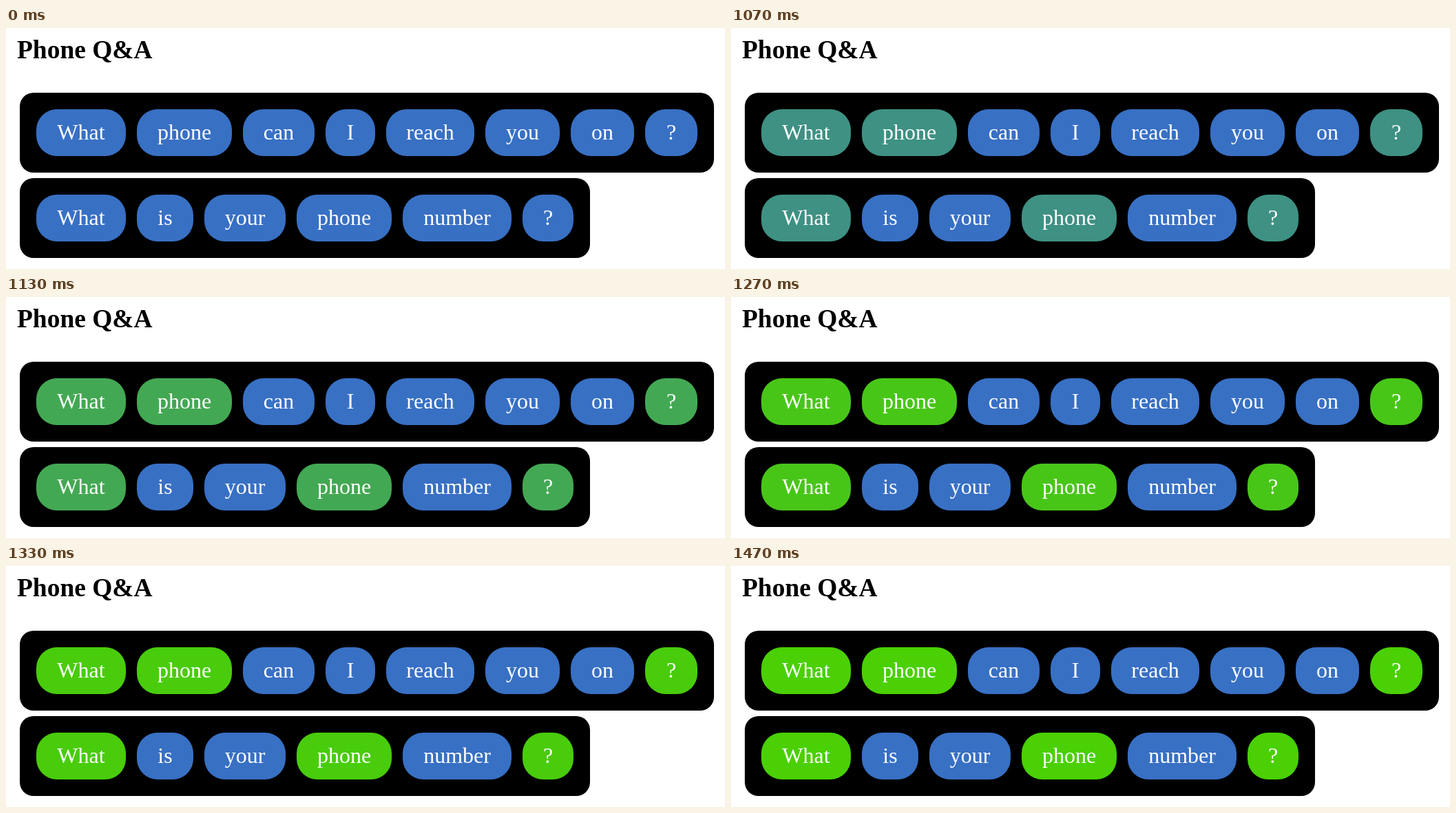
Recreate the animation shown at these times as an HTML page with a canvas. Size 1044x350 px, loop 3.07 s.

```html
<!DOCTYPE html>
<html lang="en">
<head>
<meta charset="utf-8">
<title>Phone Q&amp;A</title>
<style>
  html, body { margin: 0; width: 100%; height: 100%; overflow: hidden; background: #fff; }
  canvas { display: block; }
</style>
</head>
<body>
<canvas id="stage" width="1044" height="350"></canvas>
<script>
const ctx = document.getElementById('stage').getContext('2d');
const SERIF = '"Liberation Serif", "Times New Roman", Times, serif';
const LOOP = 3070;
const STEPS = [1000, 1070, 1130, 1200, 1270, 1330, 1400, 1470];
const FADE = 500, LEAD = 40;
const BLUE = [56, 112, 196], GREEN = [74, 208, 4];
const SHARED = ['What', 'phone', '?'];

// Each word: [text, left, width]
const rows = [
  { y: 94, w: 1008, words: [['What', 44, 130], ['phone', 190, 138], ['can', 344, 104], ['I', 464, 72],
    ['reach', 552, 128], ['you', 696, 108], ['on', 820, 92], ['?', 928, 76]] },
  { y: 218, w: 828, words: [['What', 44, 130], ['is', 190, 82], ['your', 288, 118], ['phone', 422, 138],
    ['number', 576, 158], ['?', 750, 74]] }
];

// cubic-bezier(.25, .1, .25, 1)
function ease(x) {
  if (x <= 0) return 0;
  if (x >= 1) return 1;
  const curve = (a, b, s) => 3 * a * s * (1 - s) ** 2 + 3 * b * s * s * (1 - s) + s ** 3;
  let lo = 0, hi = 1;
  for (let i = 0; i < 24; i++) {
    const mid = (lo + hi) / 2;
    if (curve(0.25, 0.25, mid) < x) lo = mid; else hi = mid;
  }
  return curve(0.1, 1, lo);
}

const mix = p => `rgb(${BLUE.map((c, i) => Math.round(c + (GREEN[i] - c) * p))})`;

function box(x, y, w, h, r, fill) {
  ctx.fillStyle = fill;
  ctx.beginPath();
  ctx.roundRect(x, y, w, h, r);
  ctx.fill();
}

function label(text, x, y, font, align, fill) {
  ctx.font = `${font} ${SERIF}`;
  ctx.textAlign = align;
  ctx.fillStyle = fill;
  ctx.fillText(text, x, y);
}

function draw(time) {
  const step = STEPS.filter(s => s <= time).pop();
  const match = step === undefined ? 0 : ease((step - STEPS[0] + LEAD) / FADE);

  ctx.fillStyle = '#fff';
  ctx.fillRect(0, 0, 1044, 350);
  label('Phone Q&A', 16, 44, 'bold 37.44px', 'left', '#000');

  for (const { y, w, words } of rows) {
    box(20, y, w, 116, 20, '#000');
    for (const [text, x, width] of words) {
      box(x, y + 24, width, 68, 30, mix(SHARED.includes(text) ? match : 0));
      label(text, x + width / 2, y + 68, '32px', 'center', '#fff');
    }
  }
}

const start = performance.now();
function tick() {
  draw((performance.now() - start) % LOOP);
  requestAnimationFrame(tick);
}
tick();
</script>
</body>
</html>
```
